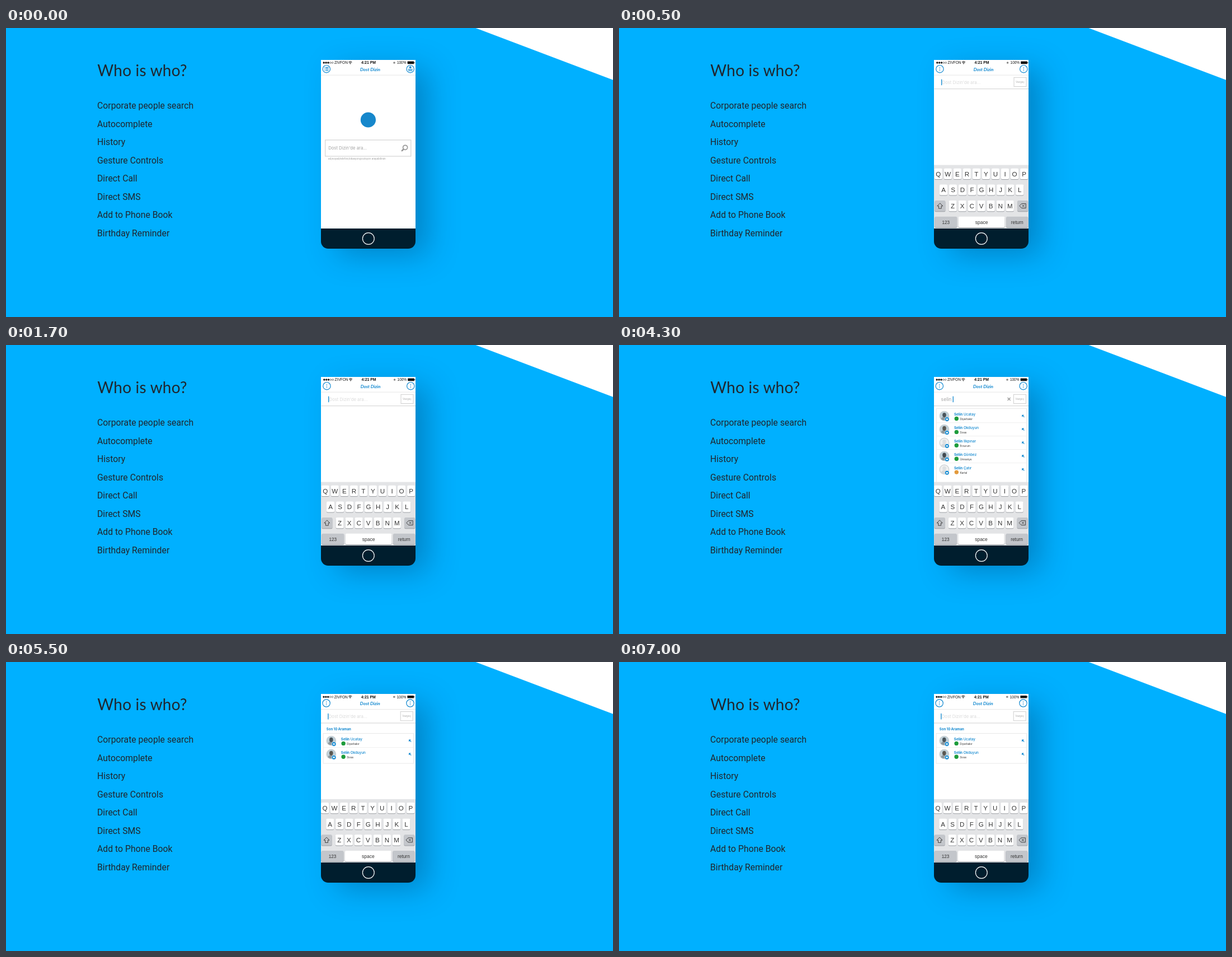
These frames come from a looping animation (1085x516 px, 8 s). An HTML page:

```html
<!DOCTYPE html>
<html lang="en">
<head>
<meta charset="utf-8">
<title>Who is who?</title>
<style>
html, body { margin: 0; width: 100%; height: 100%; overflow: hidden; background: #00b0ff; }
svg { position: absolute; left: 0; top: 0; }
.phone { position: absolute; left: 563px; top: 57px; width: 169px; height: 337px; border-radius: 0 0 13px 13px;
  background: linear-gradient(#fff 301px, #001e2e 301px); box-shadow: 25px 14px 54px -4px rgba(0, 45, 85, .34); }
.title { font: 28px Lato, sans-serif; letter-spacing: .2px; fill: #20262e; }
.list { font-family: Roboto, sans-serif; fill: #20262e; }
.sys { font-family: "Liberation Sans", Arial, sans-serif; fill: #111; }
.ui { font-family: Inter, sans-serif; }
.mark { font: italic 700 8.2px Lato, sans-serif; fill: #0f87cf; }
.blue { fill: #0f87cf; }
.line { fill: none; stroke: #0f87cf; }
.screen { visibility: hidden; animation: 8s step-end infinite; }
#home { animation-name: home; }
#empty { animation-name: empty; }
#results { animation-name: results; }
#history { animation-name: history; }
@keyframes home { 0% { visibility: visible } 6.25%, 100% { visibility: hidden } }
@keyframes empty { 0% { visibility: hidden } 6.25% { visibility: visible } 31.25%, 100% { visibility: hidden } }
@keyframes results { 0% { visibility: hidden } 31.25% { visibility: visible } 68.75%, 100% { visibility: hidden } }
@keyframes history { 0% { visibility: hidden } 68.75%, 100% { visibility: visible } }
</style>
</head>
<body>
<div class="phone"></div>
<svg width="1085" height="516" viewBox="0 0 1085 516">
  <path d="M839.5 0H1085V92.7Z" fill="#fff"/>
  <text class="title" x="163.3" y="85.5">Who is who?</text>
  <g class="list" id="list"></g>
  <circle cx="647.8" cy="376" r="10.4" fill="none" stroke="#fff" stroke-width="1.2"/>
  <clipPath id="glass"><rect x="563" y="57" width="169" height="301"/></clipPath>
  <g clip-path="url(#glass)">
    <g class="screen" id="home"></g>
    <g class="screen" id="empty"></g>
    <g class="screen" id="results"></g>
    <g class="screen" id="history"></g>
  </g>
</svg>
<script>
const put = (id, html) => document.getElementById(id).innerHTML = html;
const text = (x, y, size, str, attrs = '') => `<text x="${x}" y="${y}" font-size="${size}" ${attrs}>${str}</text>`;
const rect = (x, y, w, h, fill, attrs = '') => `<rect x="${x}" y="${y}" width="${w}" height="${h}" fill="${fill}" ${attrs}/>`;
const dot = (x, y, r, attrs = '') => `<circle cx="${x}" cy="${y}" r="${r}" ${attrs}/>`;
const path = (d, attrs) => `<path d="${d}" ${attrs}/>`;
const shift = (x, y, html) => `<g transform="translate(${x} ${y})">${html}</g>`;
const mid = 'text-anchor="middle"';

put('list', ['Corporate people search', 'Autocomplete', 'History', 'Gesture Controls', 'Direct Call',
  'Direct SMS', 'Add to Phone Book', 'Birthday Reminder'].map((s, i) => text(163, 144.2 + 32.5 * i, 15.8, s)).join(''));

function statusBar() {
  let out = '';
  for (let i = 0; i < 5; i++)
    out += dot(568.2 + 3.85 * i, 62, 1.4, `fill="${i < 3 ? '#111' : 'none'}" stroke="#111" stroke-width=".5"`);
  out += text(587, 64.4, 6.5, 'ZIVFON') + text(648, 64.4, 6.9, '4:21 PM', mid + ' font-weight="700"') + text(699, 64.4, 6.4, '100%');
  out += path('M612.4 61q3-2.8 6 0M613.6 62.4q1.8-1.6 3.6 0', 'fill="none" stroke="#111"') + dot(615.4, 63.8, .8);
  out += dot(694, 62, 1.8, 'fill="#888"');
  out += rect(717.6, 59.6, 11.6, 4.6, '#111', 'rx=".6"') + rect(729.6, 61, 1, 1.8, '#111');
  return `<g class="sys">${out}</g>`;
}

function header(isHome) {
  let out = statusBar() + text(651, 77, 8.2, 'Dost Dizin', mid + ' class="mark"');
  for (const x of [572.8, 722.7]) out += dot(x, 73.2, 6.7, 'class="line" stroke-width="1.2"');
  if (isHome) {
    out += path('M569 70.5h1m1 0h5.6M569 73.2h1m1 0h5.6M569 75.9h1m1 0h5.6', 'class="line" stroke-width="1.3"');
    out += dot(722.7, 70.2, 1.9, 'class="blue"') + path('M718.6 73.8h8.2M719 76.2h7.4', 'class="line" stroke-width="1.3"');
  } else {
    for (const x of [572.8, 722.7])
      for (const y of [70.4, 73.2, 76]) out += dot(x, y, .75, 'class="blue"');
  }
  return out + rect(563, 83.7, 170, .9, '#e4e4e4');
}

function key(x, y, w, label, size = 11.6, grey = false) {
  const h = 19.2;
  return rect(x, y + 1, w, h, '#9c9fa4', 'rx="2"') + rect(x, y, w, h, grey ? '#c3c6cb' : '#fff', 'rx="2"') +
    text(x + w / 2, y + (size > 10 ? 13.9 : 12.9), size, label, mid);
}

function keyboard() {
  let out = rect(561, 244.6, 174, 115, '#e3e4e6');
  [['QWERTYUIOP', 570.2], ['ASDFGHJKL', 579.4], ['ZXCVBNM', 596]].forEach(([row, x], r) => {
    [...row].forEach((c, i) => out += key(x + 17.03 * i - 7, 250.8 + 28.6 * r, 14, c));
  });
  out += key(563.8, 308, 19, '', 8, true) + key(711.6, 308, 19, '', 8, true);
  out += path('M573.2 312.8l5 5h-2.6v4.4h-4.8v-4.4h-2.6z', 'fill="none" stroke="#333" stroke-width=".9" stroke-linejoin="round"');
  out += path('M719 313.6h7.6v8H719l-3.8-4zM720 315.6l4 4m0-4l-4 4', 'fill="none" stroke="#333" stroke-width=".9"');
  out += key(563.8, 336.8, 39.8, '123', 8.2, true) + key(606.2, 336.8, 82.6, 'space', 8.5) + key(691.6, 336.8, 39, 'return', 8.4, true);
  return `<g class="sys" style="fill:#333">${out}</g>`;
}

function searchRow(typed) {
  const caret = typed ? 596.6 : 575.4;
  let out = typed ? text(575.6, 99.6, 8.6, typed, 'fill="#a6a6a6"') : text(577, 99.6, 7.7, "Dost Dizin'de ara...", 'fill="#dadada"');
  out += rect(caret, 91.6, 1.3, 10.6, '#0f87cf');
  if (typed) out += path('M694.6 94l5 5m0-5l-5 5', 'stroke="#999" stroke-width="1.3"');
  out += rect(705.4, 88.3, 22, 16.2, '#fff', 'stroke="#cfcfcf"') + text(716.4, 98, 4.5, 'Vazgeç', mid + ' fill="#aaa"');
  return `<g class="ui">${out}</g>` + rect(563, 108.2, 170, 1, '#d2d2d2');
}

const people = [
  ['Ucatay', 'Diyarbakır', '#4a545b'], ['Okduyun', 'Sivas', '#5a5852'], ['Ilkpınar', 'Erzurum', ''],
  ['Gönbez', 'Ümraniye', '#424a50'], ['Çatır', 'Kartal', '']
];

function person([last, city, tone], i, top) {
  const y = top + 23.9 * i;
  let out = dot(581.5, y, 8.3, `fill="${tone ? '#c0d0d8' : '#f0f0f0'}" stroke="#c9ced1" stroke-width="1.1"`);
  out += path(`M575.6 ${y + 5.6}q1-4 5.9-4t5.9 4q-2.4 2.2-5.9 2.2t-5.9-2.2z`, `fill="${tone ? '#8f999e' : '#d6d9db'}"`) +
    `<ellipse cx="581.5" cy="${y - 1.6}" rx="3.3" ry="4.1" fill="${tone || '#dde0e2'}"/>`;
  out += dot(586.3, y + 5.9, 3.9, 'class="blue" stroke="#fff" stroke-width=".6"') + rect(584.7, y + 4.7, 3.2, 2.5, '#fff', 'rx=".4"');
  out += text(599, y - .4, 6.3, `<tspan font-weight="700">Selin</tspan> ${last}`, 'class="blue" font-weight="500"');
  out += dot(603.3, y + 4.9, 3.7, `fill="${city === 'Kartal' ? '#e39a3c' : '#1e9c3c'}"`);
  out += text(609.4, y + 7.7, 4.7, city, 'fill="#333"');
  out += path(`M724.4 ${y + 2.2}l-3.6-3.6m0 3v-3h3`, 'class="line" stroke-width="1.1"');
  return out;
}

function peopleList(count, top, height) {
  let out = rect(567.2, top - 13, 161.4, height, '#fff', 'stroke="#e6e6e6" stroke-width=".9"');
  for (let i = 1; i < count; i++) out += rect(567.2, top - 12.1 + 23.9 * i, 161.4, .8, '#ececec');
  return `<g class="ui">${out}${people.slice(0, count).map((p, i) => person(p, i, top)).join('')}</g>`;
}

put('home', header(true) + dot(647.4, 164, 13.6, 'fill="#1687cb"') + `<g class="ui">` +
  rect(570.6, 200, 153.2, 29, '#fff', 'stroke="#cfcfcf" stroke-width="1.1"') +
  text(576.2, 217.2, 7.7, "Dost Dizin'de ara...", 'fill="#a3a3a3"') +
  text(576, 235.4, 4.45, 'ad/soyad/telefon/lokasyon/pozisyon arayabilirsin', 'fill="#999"') + '</g>' +
  dot(713.6, 213.3, 4, 'fill="none" stroke="#999" stroke-width="1.7"') +
  path('M710.4 216.5l-2.6 2.6', 'stroke="#999" stroke-width="2.6" stroke-linecap="round"'));
put('empty', shift(.6, 0, header() + searchRow() + keyboard()));
put('results', header() + searchRow('selin') + peopleList(5, 126.6, 140) + keyboard());
put('history', shift(-.2, .3, header() + searchRow() +
  `<g class="ui">${text(573, 122.2, 6, 'Son 10 Araman', 'class="blue" font-weight="700"')}</g>` +
  peopleList(2, 140.2, 53.6) + keyboard()));
</script>
</body>
</html>
```
